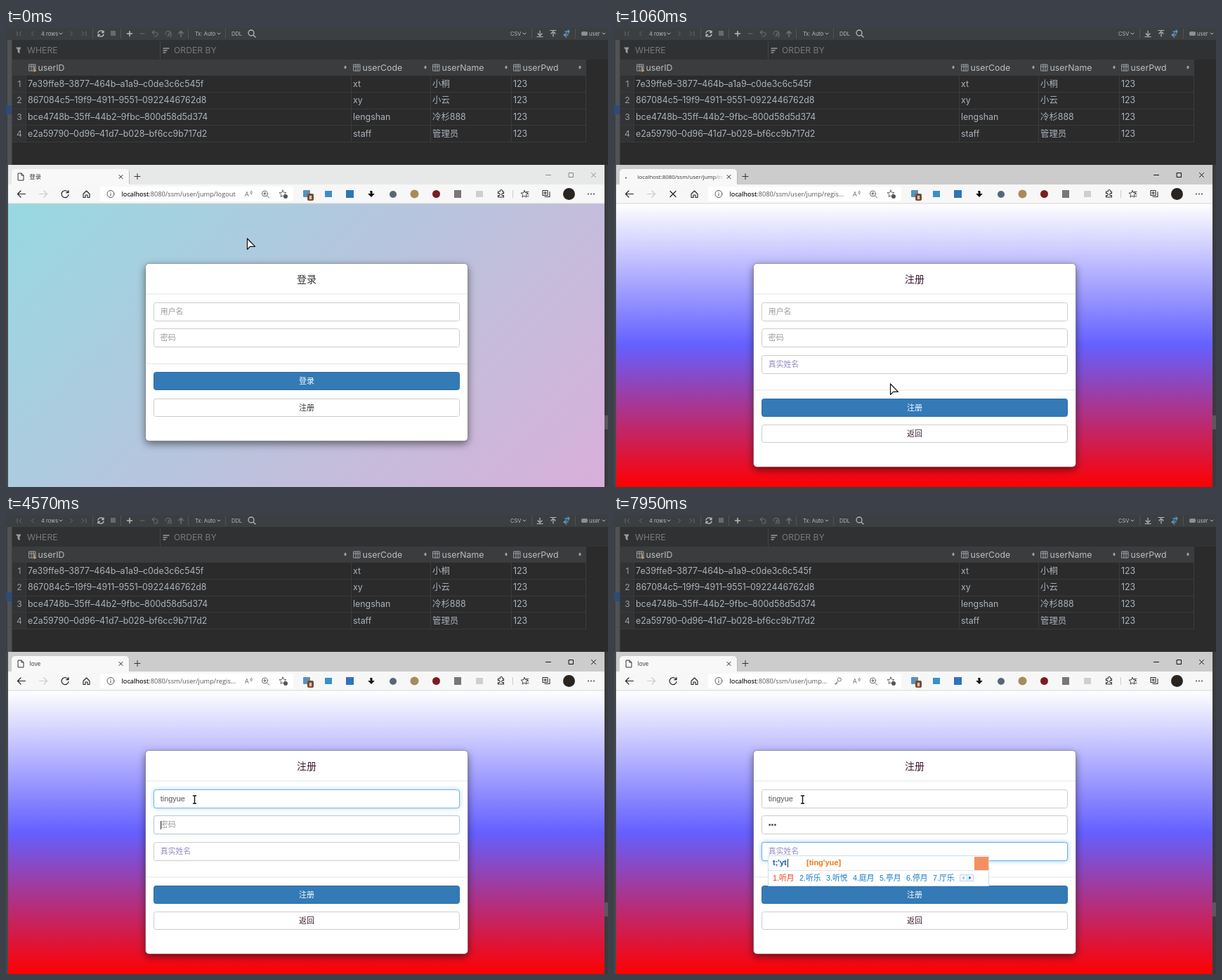
Recreate the animation shown at these times as an HTML page with a canvas. Size 857 by 654 pixels, loop 8000 ms.

```html
<!DOCTYPE html>
<html lang="zh">
<head>
<meta charset="utf-8">
<style>
html, body { margin: 0; width: 100%; height: 100%; overflow: hidden; background: #2b2b2b; }
canvas { display: block; width: 857px; height: 654px; }
</style>
</head>
<body>
<canvas id="stage" width="857" height="654"></canvas>
<script>
const ctx = document.getElementById('stage').getContext('2d');
const LOOP = 8000;
const CJK = '"Noto Sans CJK SC", "Noto Sans CJK", sans-serif';
const IDE = 'Inter, ' + CJK;
const UI = '"Open Sans", ' + CJK;
const PAGE = '"Liberation Sans", ' + CJK;

// Moments at which the picture switches state
const T = { press: 890, load: 960, page: 1050, loaded: 1130, focus1: 2130, focus2: 4540, key: 5320, focus3: 5730 };

const clamp = v => Math.max(0, Math.min(1, v));
const smooth = v => v * v * (3 - 2 * v);

function rect(x, y, w, h, color) {
  ctx.fillStyle = color;
  ctx.fillRect(x, y, w, h);
}

function round(x, y, w, h, r, fill, stroke) {
  ctx.beginPath();
  ctx.roundRect(x, y, w, h, r);
  if (fill) { ctx.fillStyle = fill; ctx.fill(); }
  if (stroke) { ctx.strokeStyle = stroke; ctx.lineWidth = 1; ctx.stroke(); }
}

function dot(x, y, r, color) {
  ctx.beginPath();
  ctx.arc(x, y, r, 0, Math.PI * 2);
  ctx.fillStyle = color;
  ctx.fill();
}

// y is the middle of the capital letters
function text(s, x, y, size, color, family, align = 'left', weight = '') {
  ctx.font = `${weight} ${size}px ${family}`;
  ctx.textAlign = align;
  ctx.fillStyle = color;
  ctx.fillText(s, x, y + size * 0.36);
}

// Line icon centred on x, y
function icon(x, y, d, color, width = 1, fill) {
  ctx.save();
  ctx.translate(x, y);
  const path = new Path2D(d);
  if (fill) { ctx.fillStyle = fill; ctx.fill(path); }
  ctx.strokeStyle = color;
  ctx.lineWidth = width;
  ctx.lineJoin = ctx.lineCap = 'round';
  ctx.stroke(path);
  ctx.restore();
}

const ICON = {
  chevron: 'M-2 -1L0 1L2 -1',
  left: 'M1.5 -3L-1.5 0L1.5 3',
  right: 'M-1.5 -3L1.5 0L-1.5 3',
  cross: 'M-3 -3L3 3M3 -3L-3 3',
  plus: 'M-4 0H4M0 -4V4',
  reload: 'M4.6 -2A5 5 0 1 0 5 1M5 -5V-1.8H1.8',
  back: 'M5.5 0H-5M-1 -4.5L-5.5 0L-1 4.5',
  home: 'M-4.5 0L0 -4.5L4.5 0V5H1.5V1.5H-1.5V5H-4.5Z',
  lens: 'M2 2L5 5M3 -1A4 4 0 1 1 -5 -1A4 4 0 1 1 3 -1',
  page: 'M-3.5 -5H1L4 -2V5H-3.5ZM1 -5V-2H4',
  star: 'M0 -5L1.4 -1.8L5 -1.4L2.3 1L3 4.6L0 2.8L-3 4.6L-2.3 1L-5 -1.4L-1.4 -1.8Z',
  key: 'M4.5 -2A2.6 2.6 0 1 1 -.7 -2A2.6 2.6 0 1 1 4.5 -2M0 0L-4.5 4.5H-2.5V2.8H-1',
  puzzle: 'M-4 -3H-1A1.7 1.7 0 1 1 2 -3H4V0A1.7 1.7 0 1 0 4 2.5V5H-4V2.5A1.7 1.7 0 1 0 -4 0Z',
  down: 'M0 -4V1M-3 0L0 3L3 0M-4 4.5H4',
  up: 'M0 4V-1M-3 0L0 -3L3 0M-4 -4.5H4'
};

function drawColumnIcon(x, key) {
  icon(x, 56.5, 'M-4.5 -4.5H4.5V4.5H-4.5ZM-4.5 -1.5H4.5M-1.5 -4.5V4.5M1.5 -4.5V4.5', '#9aa0a5', 1);
  if (key) icon(x + 3, 58, 'M0 -1V4M0 3H2', '#d0a050', 1.5);
}

function drawDatabase() {
  rect(0, 0, 857, 654, '#2b2b2b');
  rect(0, 0, 857, 17, '#3c3f41');
  rect(0, 17, 9, 637, '#3c3f41');
  rect(2, 17, 6, 178, '#505355');
  rect(0, 110, 8, 13, '#304a78');
  rect(852, 195, 5, 459, '#393b3d');
  rect(852, 552, 5, 20, '#58595b');
  rect(0, 195, 3, 459, '#46494b');

  const dim = '#686b6d', lit = '#b8babc';
  icon(19, 8, 'M-3 -3V3M3 -3L0 0L3 3', dim);
  icon(38, 8, ICON.left, dim);
  text('4 rows', 50, 8, 7.5, lit, IDE);
  icon(78, 8, ICON.chevron, lit);
  icon(93, 8, ICON.right, dim);
  icon(111, 8, 'M3 -3V3M-3 -3L0 0L-3 3', dim);
  icon(135, 8, 'M-4 -1A4 4 0 0 1 3.5 -2M4 -4V-1.5H1.5M4 1A4 4 0 0 1 -3.5 2M-4 4V1.5H-1.5', lit, 1.3);
  rect(149, 4, 7, 7, dim);
  icon(176, 8, 'M-3.5 0H3.5M0 -3.5V3.5', lit, 1.5);
  icon(194, 8, 'M-3 0H3', dim, 1.2);
  icon(212, 8, 'M-1 -4L-4 -2L-1 1M-4 -2H1A3 3 0 0 1 1 4H-1', dim, 1.2);
  icon(231, 8, 'M-4 1A4 4 0 0 1 4 0M-1 4L2 1M2 4H4V1A2 2 0 1 0 0 1', dim, 1.2);
  icon(249, 8, 'M0 4V-3.5M-3 -.5L0 -3.5L3 -.5', dim, 1.8);
  for (const x of [123, 163, 259, 312, 748, 810]) rect(x, 1, 1, 14, '#515456');
  text('Tx: Auto', 269, 8, 7.5, lit, IDE);
  icon(303, 8, ICON.chevron, lit);
  text('DDL', 321, 8, 7.5, lit, IDE);
  icon(350, 8, ICON.lens, lit, 1.3);
  text('CSV', 718, 8, 7.5, lit, IDE);
  icon(738, 8, ICON.chevron, lit);
  icon(760, 8, ICON.down, lit, 1.2);
  icon(779, 8, ICON.up, lit, 1.2);
  icon(798, 8, 'M-4 2H2M0 -1L-4 2L0 5M-2 -3H4M2 -5L4 -3L2 0', '#5e98c8', 1.3);
  round(819, 5, 9, 6, 2, '#8d9093');
  text('user', 830, 8, 7.5, lit, IDE);
  icon(851, 8, ICON.chevron, lit);

  rect(9, 17, 848, 28, '#303132');
  icon(19, 32, 'M-4 -4H2L0 -1V4L-2 2V-1Z', '#9a9c9e', 1, '#9a9c9e');
  text('WHERE', 30, 32, 12.2, '#77797b', IDE);
  rect(219, 19, 1, 26, '#424446');
  icon(229, 32, 'M-5 -3H3M-5 0H0M-5 3H-2', '#9a9c9e', 1.3);
  text('ORDER BY', 239, 32, 12.2, '#77797b', IDE);

  rect(9, 45, 817, 22, '#3a3c3e');
  rect(9, 67, 19, 95, '#313335');
  for (const y of [67, 91, 115, 138, 162]) rect(9, y, 817, 1, '#393a3b');
  for (const x of [28, 491, 604, 719, 825]) rect(x, 45, 1, 117, '#3a3c3d');

  const columns = [[46, 'userID', 483], [508, 'userCode', 597], [621, 'userName', 712], [736, 'userPwd', 817]];
  columns.forEach(([x, name, sort], i) => {
    drawColumnIcon(x - 8.5, i === 0);
    text(name, x - .5, 56.5, 12.3, '#bbbdbf', IDE);
    icon(sort, 56, 'M-1 -1L0 -2L1 -1ZM-1 1L0 2L1 1Z', '#b0b2b4', 1);
  });
  const rows = [
    ['7e39ffe8–3877–464b–a1a9–c0de3c6c545f', 'xt', '小桐'],
    ['867084c5–19f9–4911–9551–0922446762d8', 'xy', '小云'],
    ['bce4748b–35ff–44b2–9fbc–800d58d5d374', 'lengshan', '冷杉888'],
    ['e2a59790–0d96–41d7–b028–bf6cc9b717d2', 'staff', '管理员']
  ];
  rows.forEach(([id, code, name], i) => {
    const y = 79.3 + i * 23.7;
    text(i + 1, 19, y, 12.2, '#9b9da0', IDE, 'center');
    [[id, 31], [code, 494], [name, 607], ['123', 722]].forEach(([s, x]) => text(s, x, y, 12.4, '#a9b3be', IDE));
  });
}

function drawBrowser(t) {
  const active = t >= T.press, loading = t >= T.load && t < T.loaded;
  rect(3, 195, 849, 28, active ? '#cccccc' : '#e7e9e8');
  rect(3, 223, 849, 27, '#f7f7f7');
  round(8, 201, 167, 24, [5, 5, 0, 0], '#f8f8f8');
  rect(175, 204, 1, 18, '#c4b4c0');

  ctx.save();
  ctx.beginPath();
  ctx.rect(30, 200, 125, 22);
  ctx.clip();
  if (loading) {
    const fade = ctx.createLinearGradient(142, 0, 156, 0);
    fade.addColorStop(0, '#333');
    fade.addColorStop(1, 'rgba(51,51,51,0)');
    text('localhost:8080/ssm/user/jump/register', 33.5, 212, 7.9, fade, UI);
  } else {
    text(t < T.load ? '登录' : 'love', 33.5, 212, 8.3, '#333', UI);
  }
  ctx.restore();
  if (loading) dot(17, 213.5, 1, '#444');
  else icon(21, 212, ICON.page, '#333');
  icon(163.5, 212, 'M-2.5 -2.5L2.5 2.5M2.5 -2.5L-2.5 2.5', '#222');
  icon(187, 211.5, ICON.plus, '#333');
  const control = active ? '#111' : '#888';
  icon(772, 209.5, 'M-3.5 0H3.5', control);
  icon(804.5, 209.5, 'M-3 -3H3V3H-3Z', control);
  icon(836.5, 209.5, ICON.cross, control);

  icon(22, 236.5, ICON.back, '#222', 1.2);
  icon(53, 236.5, 'M-5.5 0H5M1 -4.5L5.5 0L1 4.5', '#ccc', 1.2);
  icon(84, 236.5, loading ? 'M-4 -4L4 4M4 -4L-4 4' : ICON.reload, '#222', 1.2);
  icon(114.5, 236.5, ICON.home, '#222', 1.1);
  round(134, 226, 275, 21, 3, '#fff');
  icon(149, 236.5, 'M5 0A5 5 0 1 1 -5 0A5 5 0 1 1 5 0M0 -.5V2.5M0 -2.5V-2.4', '#555');
  const url = 'localhost:8080/ssm/user/jump';
  const tail = t < T.load ? '/logout' : t < T.key ? '/regis...' : '...';
  text(url + tail, 164.5, 236.5, 9.25, '#555', UI);
  text('localhost', 164.5, 236.5, 9.25, '#222', UI);
  if (t >= T.key) icon(319, 236.5, ICON.key, '#777');
  text('A', 340, 237, 9, '#666', UI);
  icon(348, 234, 'M0 -1Q1 0 0 2M1.5 -2Q3.5 0 1.5 3', '#666', .8);
  icon(369.5, 237, ICON.lens + 'M-3 -1H1M-1 -3V1', '#555', .9);
  icon(394, 236, ICON.star, '#555', .9);
  dot(398, 240, 3, '#555');

  // Extension badges
  round(423, 231, 10, 10, 1, '#5a91b8');
  round(429, 236, 9, 10, 2, '#7a4a2c');
  text('8', 433.5, 241, 7, '#fff', UI, 'center', 'bold');
  round(454, 232, 10, 9, 0, '#398fce');
  round(484, 231, 11, 11, 0, '#2d73bc');
  icon(520, 236.5, 'M-1 -4H1V0H4L0 4L-4 0H-1Z', '#111', 1, '#111');
  dot(551, 237, 5, '#56677c');
  dot(581.5, 236.5, 6, '#a88b58');
  dot(612.5, 236.5, 5.5, '#7c1c22');
  round(638, 231, 10, 11, 0, '#777');
  round(669, 232, 10, 9, 0, '#cfcfcf');
  icon(704.5, 236, ICON.puzzle, '#333', 1.1);
  rect(721, 231, 1, 11, '#ccc');
  icon(738, 236.5, ICON.star + 'M2 -3H6M4 0H6M4 3H6', '#333', .9);
  icon(769, 236.5, 'M-5 -5H2V2H-5ZM-2 4H5V-3M-1.5 -3.5V.5M-3.5 -1.5H.5', '#333', 1.1);
  dot(801.5, 236.5, 8.5, '#292420');
  for (const x of [829, 833, 837]) dot(x, 236.5, .9, '#333');
}

function drawBackdrop(register) {
  let g;
  if (register) {
    g = ctx.createLinearGradient(0, 250, 0, 654);
    g.addColorStop(0, '#fff');
    g.addColorStop(.5, '#6460ff');
    g.addColorStop(1, '#f00');
  } else {
    // 135 degrees, corner to corner
    const cx = 427.5, cy = 452, half = (849 + 404) / 4;
    g = ctx.createLinearGradient(cx - half, cy - half, cx + half, cy + half);
    g.addColorStop(0, '#97d9e1');
    g.addColorStop(1, '#d9afd9');
  }
  rect(3, 250, 849, 404, g);
  rect(3, 249.5, 849, 1, '#d8d8d8');
}

function drawField(y, value, hint, glow, hintColor = '#999') {
  const box = [210.5, y, 435, 26, 3];
  ctx.save();
  ctx.shadowColor = `rgba(102,175,233,${.75 * glow})`;
  ctx.shadowBlur = 7;
  round(...box, '#fff');
  ctx.restore();
  round(...box, '#fff', '#ccc');
  ctx.save();
  ctx.globalAlpha = glow;
  round(...box, null, '#66afe9');
  ctx.restore();
  text(value || hint, 219.8, y + 12.8, 10.85, value ? '#555' : hintColor, PAGE);
}

function drawButton(y, label, fill, stroke, color) {
  round(210.5, y, 435, 25, 3, fill, stroke);
  text(label, 428, y + 12.5, 11, color, PAGE, 'center');
}

function drawCard(height, title) {
  ctx.save();
  ctx.shadowColor = 'rgba(0,0,0,.5)';
  ctx.shadowBlur = 12;
  ctx.shadowOffsetY = 4;
  round(198.5, 335.5, 459, height + 1, 5, '#fff');
  ctx.restore();
  round(198.5, 335.5, 459, height + 1, 5, null, 'rgba(0,0,0,.3)');
  text(title, 428, 357.5, 14, height > 260 ? '#3a1a30' : '#333', PAGE, 'center');
  rect(199, 378.5, 458, 1, '#e5e5e5');
}

function drawLogin(hover, status) {
  drawBackdrop(false);
  drawCard(252, '登录');
  drawField(391.5, '', '用户名', 0);
  drawField(428.5, '', '密码', 0);
  rect(199, 478, 458, 1, '#e5e5e5');
  drawButton(490.5, '登录', '#337ab7', '#2e6da4', '#fff');
  drawButton(528.5, '注册', hover ? '#e6e6e6' : '#fff', hover ? '#adadad' : '#ccc', '#333');
  if (status) {
    round(2, 640, 150, 14, [0, 3, 0, 0], '#d5e3e9', '#bccbd2');
    text('localhost:8080/ssm/user/jump/register', 5, 647.5, 7.9, '#6c7880', UI);
  }
}

const NAME = 'tingyue';
const nameKeys = [2550, 2810, 2970, 3120, 3690, 3950, 4110];
const passKeys = [5070, 5230, 5410];
const count = (keys, t) => keys.filter(k => t >= k).length;

function caretShown(t, since) {
  return Math.floor((t - since) / 510) % 2 === 0;
}

function drawCaret(x, y) {
  rect(Math.round(x), y, 1, 12, '#333');
}

function glow(t, on, off) {
  return clamp((t - on) / 150) * (1 - clamp((t - off) / 150));
}

function drawRegister(t) {
  drawBackdrop(true);
  drawCard(289, '注册');
  const name = NAME.slice(0, count(nameKeys, t));
  const pass = '•'.repeat(count(passKeys, t));
  drawField(391.5, name, '用户名', glow(t, T.focus1, T.focus2));
  drawField(428.5, pass, '密码', glow(t, T.focus2, T.focus3));
  drawField(466.5, '', '真实姓名', glow(t, T.focus3, LOOP), '#948bc4');
  rect(199, 515.5, 458, 1, '#e5e5e5');
  drawButton(528.5, '注册', '#337ab7', '#2e6da4', '#fff');
  drawButton(565.5, '返回', '#fff', '#ccc', '#3a1a30');

  ctx.font = `10.85px ${PAGE}`;
  const end = s => 220 + ctx.measureText(s).width;
  if (t >= T.focus1 && t < T.focus2) {
    const last = nameKeys.filter(k => t >= k).pop() || T.focus1;
    if (caretShown(t, last)) drawCaret(end(name), 398);
  } else if (t >= T.focus2 && t < T.focus3) {
    const last = passKeys.filter(k => t >= k).pop() || T.focus2;
    if (caretShown(t, last)) drawCaret(end(pass), 436);
  } else if (t >= T.focus3 && caretShown(t, 5400)) {
    drawCaret(220, 473);
  }
  if (t >= passKeys[1] && t < T.focus3) {
    icon(628, 441.5, 'M-5 1Q0 -6 5 1M2 1A2 2 0 1 1 -2 1A2 2 0 1 1 2 1', '#333');
  }
}

const imeSteps = [
  [6200, 't', 't', '他 她 它 天 听 太 同'],
  [6730, 'tu', 'tu', '图 土 突 兔 吐 途 徒'],
  [7150, 't;', 'ting', '听 停 挺 厅 庭 亭 艇'],
  [7380, "t;'y", "ting'y", '听月 听雨 庭院 停用 听音 廷议 听言'],
  [7600, "t;'yt", "ting'yue", '听月 听乐 听悦 庭月 亭月 停月 厅乐']
];

function drawIme(t) {
  const step = imeSteps.filter(s => t >= s[0]).pop();
  if (!step) return;
  const [, typed, sound, list] = step;
  const words = list.split(' ');
  const pitch = 16 + words[0].length * 11;
  const right = 268 + pitch * 7;
  round(219.5, 485.5, right - 220, 43, 0, '#fff', '#cfdfec');
  rect(220, 506, right - 221, 1, '#dce6ee');
  text(typed, 226, 495.5, 11, '#0a5fb4', PAGE, 'left', 'bold');
  rect(Math.round(227 + ctx.measureText(typed).width), 490, 1, 12, '#222');
  text(`[${sound}]`, 274, 495.5, 11, '#f07814', PAGE, 'left', 'bold');
  words.forEach((w, i) => text(`${i + 1}.${w}`, 226 + i * pitch, 517, 10.8, i ? '#1478cc' : '#f03a20', PAGE));
  const x = 226 + pitch * 7;
  round(x + .5, 512.5, 19, 9, 0, '#f3f8fc', '#c5d9e8');
  rect(x + 10, 513, 1, 8, '#c5d9e8');
  icon(x + 5, 517, 'M1 -1.5L-1 0L1 1.5Z', '#a5c5dd', 1, '#a5c5dd');
  icon(x + 15, 517, 'M-1 -1.5L1 0L-1 1.5Z', '#1478cc', 1, '#1478cc');
  rect(right - 21, 487, 20, 19, '#f4905f');
}

// Time, x, y of the pointer tip
const route = [
  [0, 343, 300], [30, 343, 300], [430, 404, 544], [530, 403, 545], [890, 403, 545],
  [1020, 409, 528], [1060, 393, 507], [1460, 335, 405], [1660, 335, 405], [2290, 268.5, 405.5], [LOOP, 268.5, 405.5]
];

function pointerAt(t) {
  const i = route.findIndex(p => p[0] > t);
  const [t0, x0, y0] = route[i - 1], [t1, x1, y1] = route[i];
  const raw = (t - t0) / (t1 - t0);
  const k = t1 - t0 > 300 ? smooth(raw) : raw;
  return [x0 + (x1 - x0) * k, y0 + (y1 - y0) * k];
}

function drawPointer(x, y, kind) {
  if (kind === 'hand') {
    icon(x, y, 'M0 1Q1.5 -1 2.5 1V6Q4 5 5 6.5Q6.5 5.5 7.5 7Q9 6.5 9 8.5V11L7.5 14H1.5L-3 9Q-3.5 7 -1.5 8L0 9Z', '#111', 1.1, '#fff');
  } else if (kind === 'beam') {
    const d = 'M-2 -5.5H-.5L0 -5L.5 -5.5H2M0 -5V5M-2 5.5H-.5L0 5L.5 5.5H2';
    icon(x, y, d, '#fff', 3);
    icon(x, y, d, '#111', 1.4);
  } else {
    icon(x, y, 'M.5 0V15.5L4.5 11.3H11.5Z', '#111', 1.2, '#fff');
  }
}

function draw(t) {
  const [x, y] = pointerAt(t);
  const over = (top, bottom) => x > 209 && x < 646 && y >= top && y < bottom;
  const register = t >= T.page;
  const hand = over(528, 555) && t < T.load;
  drawDatabase();
  drawBrowser(t);
  if (register) {
    drawRegister(t);
    drawIme(t);
  } else {
    // A pressed button keeps its shade until the page is replaced
    drawLogin(hand || t >= T.press, hand);
  }
  const beam = over(391, 418) || over(429, 455) || (register && over(466, 493));
  drawPointer(x, y, hand ? 'hand' : beam ? 'beam' : 'arrow');
}

const start = performance.now();
function frame() {
  draw((performance.now() - start) % LOOP);
  requestAnimationFrame(frame);
}
frame();
</script>
</body>
</html>
```
